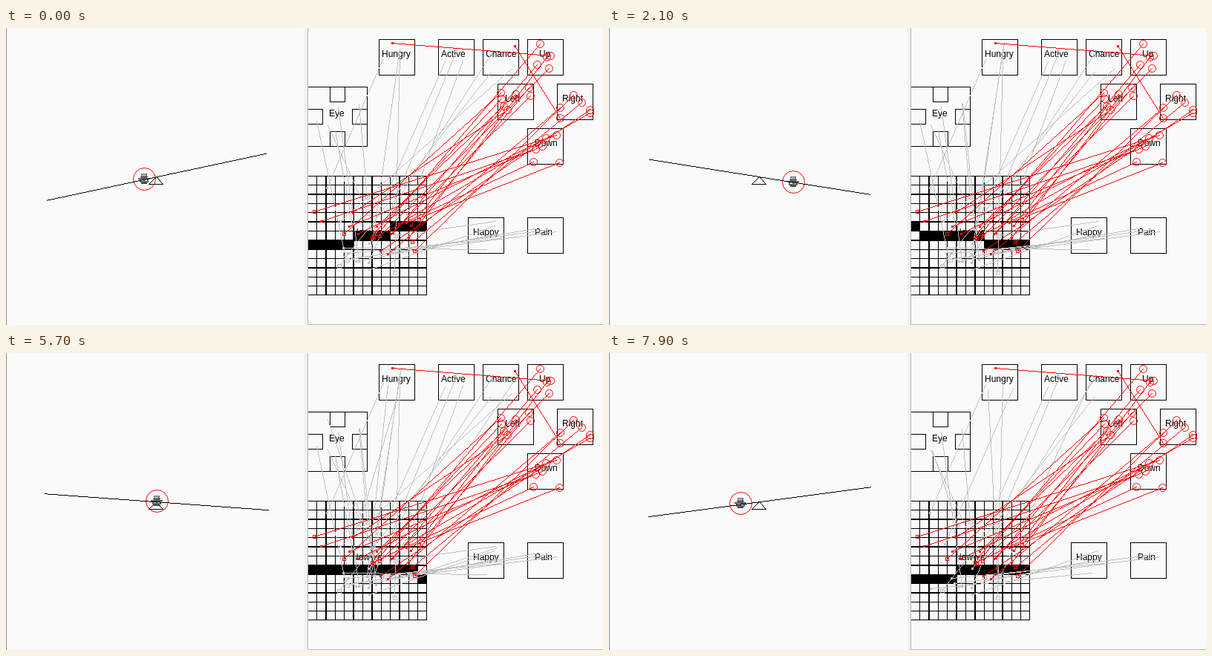
An HTML page with a canvas that plays this animation: 804x400 px, repeating every 8000 ms.

```html
<!DOCTYPE html>
<html lang="en">
<head>
<meta charset="utf-8">
<title>Seesaw balance</title>
<style>
  html, body { margin: 0; width: 100%; height: 100%; overflow: hidden; background: #fafafa; }
  canvas { display: block; width: 804px; height: 400px; }
</style>
</head>
<body>
<canvas id="stage" width="804" height="400"></canvas>
<script>
const g = document.getElementById('stage').getContext('2d');
const LOOP = 8000, STEP = 100;
const RED = '#ff0000', GREY = '#c0c0c0', BLACK = '#000';
const PIVOT = { x: 202.5, y: 200.2 };
const CELLS = 13, PITCH = 12.36;

// time, beam slope, walker x, beam row at the middle of the walker's view
const POSES = [
  [0, -0.2136, 186, 6.6],
  [1400, 0.242, 271, 6.12],
  [3000, 0.0365, 211, 7.84],
  [4000, 0.06, 206, 7.74],
  [5700, 0.073, 203, 7.6],
  [6500, 0.1037, 223, 7.6],
  [7900, -0.1338, 177, 7.82]
];

const box = (col, row) => ({ x: 502 + col * 20, y: 15 + row * 20, size: 48 });
const BOXES = {
  Hungry: box(0, 0), Active: box(4, 0), Chance: box(7, 0), Up: box(10, 0),
  Left: box(8, 3), Right: box(12, 3), Down: box(10, 6),
  Happy: box(6, 12), Pain: box(10, 12),
  Eye: { x: 406, y: 79, size: 80 }
};

let seed = 11;
function rand(min, max) {
  seed = (seed * 16807) % 2147483647;
  return Math.round(min + (max - min) * seed / 2147483647);
}

const inBox = ({ x, y, size }) => [rand(x + 4, x + size - 2), rand(y + 4, y + size - 2)];

// red links run from the busy middle of the retina to the motor boxes
function motorLinks() {
  const links = [[520, 20, 733, 37], [685, 24, 746, 121]];
  const counts = { Up: 4, Left: 7, Right: 5, Down: 6 };
  for (const name in counts) {
    const low = name === 'Up' || name === 'Right';
    for (let i = 0; i < counts[name]; i++) {
      const x = low ? rand(495, 550) : rand(408, 562);
      const y = low ? rand(262, 310) : rand(245, 285);
      links.push([x, y, ...inBox(BOXES[name])]);
    }
  }
  return links;
}

// grey links come and go: each group lives between two times
function sensorLinks(count, from, to) {
  const names = ['Hungry', 'Eye', 'Happy', 'Chance', 'Pain', 'Active', 'Eye', 'Happy'];
  return Array.from({ length: count }, (_, i) => {
    const name = names[i % names.length];
    const y = name === 'Happy' || name === 'Pain' ? rand(278, 325) : rand(215, 330);
    const x = name === 'Eye' ? rand(430, 500) : rand(430, 550);
    return { from, to, ends: [...inBox(BOXES[name]), x, y] };
  });
}

const MOTOR = motorLinks();
const SENSOR = [
  ...sensorLinks(14, 0, LOOP),
  ...sensorLinks(8, 0, 6100),
  ...sensorLinks(2, 1800, 6100),
  ...sensorLinks(1, 3500, 6100),
  ...sensorLinks(4, 4700, 6100),
  ...sensorLinks(4, 6100, LOOP),
  ...sensorLinks(1, 7200, LOOP)
];

function rect(x, y, w, h, color) {
  g.fillStyle = color;
  g.fillRect(x, y, w, h);
}

function frame(x, y, size, color) {
  g.strokeStyle = color;
  g.strokeRect(x + 0.5, y + 0.5, size, size);
}

// hard-edged line, one pixel wide
function line(x0, y0, x1, y1, color) {
  const n = Math.ceil(Math.max(Math.abs(x1 - x0), Math.abs(y1 - y0), 1));
  for (let i = 0; i <= n; i++) {
    rect(Math.round(x0 + (x1 - x0) * i / n), Math.round(y0 + (y1 - y0) * i / n), 1, 1, color);
  }
}

function ring(x, y, r) {
  g.strokeStyle = RED;
  g.beginPath();
  g.arc(x + 0.5, y + 0.5, r, 0, Math.PI * 2);
  g.stroke();
}

function label(s, x, y) {
  g.fillStyle = BLACK;
  g.font = '12px "Liberation Sans", Arial, sans-serif';
  g.fillText(s, x - 2 - 3 * s.length, y);
}

// monotone cubic through the poses
function pose(t) {
  let k = 0;
  while (k < POSES.length - 2 && t >= POSES[k + 1][0]) k++;
  const a = POSES[k], b = POSES[k + 1], h = b[0] - a[0], u = (t - a[0]) / h;
  const tangent = (j, c) => {
    const p = POSES[j - 1], q = POSES[j], r = POSES[j + 1];
    if (!p || !r) return 0;
    const d0 = (q[c] - p[c]) / (q[0] - p[0]), d1 = (r[c] - q[c]) / (r[0] - q[0]);
    return d0 * d1 <= 0 ? 0 : 2 * d0 * d1 / (d0 + d1);
  };
  const [slope, x, mid] = [1, 2, 3].map(c =>
    a[c] * (1 + 2 * u) * (1 - u) ** 2 + b[c] * u * u * (3 - 2 * u) +
    h * (tangent(k, c) * u * (1 - u) ** 2 + tangent(k + 1, c) * u * u * (u - 1)));
  return { slope, x, mid };
}

function walker(x, y) {
  rect(x - 4, y - 7, 8, 6, '#777');
  rect(x - 3, y - 6, 5, 3, '#aaa');
  rect(x - 5, y - 3, 10, 1, '#333');
  rect(x - 8, y - 1, 16, 2, '#555');
  rect(x - 6, y + 1, 12, 4, '#666');
  rect(x - 4, y + 1, 3, 2, '#ddd');
  rect(x + 1, y + 1, 3, 2, '#ddd');
  rect(x - 4, y + 5, 8, 2, '#444');
  ring(x, y, 15);
}

function seesaw({ slope, x, mid }) {
  const a = Math.atan(slope), dx = 150.5 * Math.cos(a), dy = 150.5 * Math.sin(a);
  line(202, 200, 192, 210, BLACK);
  line(202, 200, 211, 210, BLACK);
  line(192, 210, 211, 210, BLACK);
  // the view shows one row per pixel, so the row also gives the walker's height
  walker(Math.round(x), Math.round(PIVOT.y + slope * (x - PIVOT.x) - mid + 6.2));
  line(PIVOT.x - dx, PIVOT.y - dy, PIVOT.x + dx, PIVOT.y + dy, BLACK);
}

function retina({ slope, mid }) {
  for (let c = 0; c < CELLS; c++) {
    const hit = Math.floor(mid + 0.95 * slope * (c - 6));
    for (let r = 0; r < CELLS; r++) {
      const x = 406 + Math.round(c * PITCH), y = 199 + Math.round(r * PITCH);
      if (r === hit) rect(x, y, 13, 13, BLACK);
      else frame(x, y, 12, BLACK);
    }
  }
  label('New-ve', 486, 279);
}

function boxes() {
  for (const name in BOXES) {
    const { x, y, size } = BOXES[name];
    frame(x, y, size, BLACK);
    label(name, x + size / 2, y + size / 2 + (name === 'Eye' ? 0 : 0));
  }
  const { x, y } = BOXES.Eye;
  for (const far of [0, 60]) {
    frame(x + 30, y + far, 20, BLACK);
    frame(x + far, y + 30, 20, BLACK);
  }
}

function sensorLink({ ends }, i) {
  const [, , x, y] = ends;
  line(...ends, GREY);
  if (i % 3) rect(x - 1, y - 1, 3, 3, GREY);
  else frame(x - 2, y - 2, 5, GREY);
}

function motorLink(ends, i) {
  const [x, y, tx, ty] = ends;
  line(...ends, RED);
  if (i % 3 === 2) frame(x - 2, y - 2, 4, RED);
  else rect(x - 1, y - 1, 3, 3, RED);
  ring(tx, ty, 5);
}

function draw(t) {
  const now = pose(t);
  // a half-painted panel shows once in every nine steps
  const partial = t % 900 === 500 && t < 7300;
  const edge = '#b4b4b4';

  g.lineWidth = 1;
  rect(0, 0, 804, 400, '#fafafa');
  rect(0, 0, 1, 400, '#828f9c');
  seesaw(now);
  rect(402, 0, 4, 400, '#f0f0f0');

  g.save();
  g.beginPath();
  g.rect(406, 0, 398, 400);
  g.clip();
  retina(now);
  boxes();
  SENSOR.filter((s, i) => t >= s.from && t < s.to && (!partial || i % 6 === 0)).forEach(sensorLink);
  MOTOR.forEach(motorLink);
  g.restore();

  rect(406, 399, 398, 1, partial ? '#808080' : edge);
  rect(406, 0, 1, 400, partial ? RED : edge);
}

const start = performance.now();
let shown = -1;
function tick() {
  const t = Math.floor((performance.now() - start) % LOOP / STEP) * STEP;
  if (t !== shown) draw(shown = t);
  requestAnimationFrame(tick);
}
tick();
</script>
</body>
</html>
```
